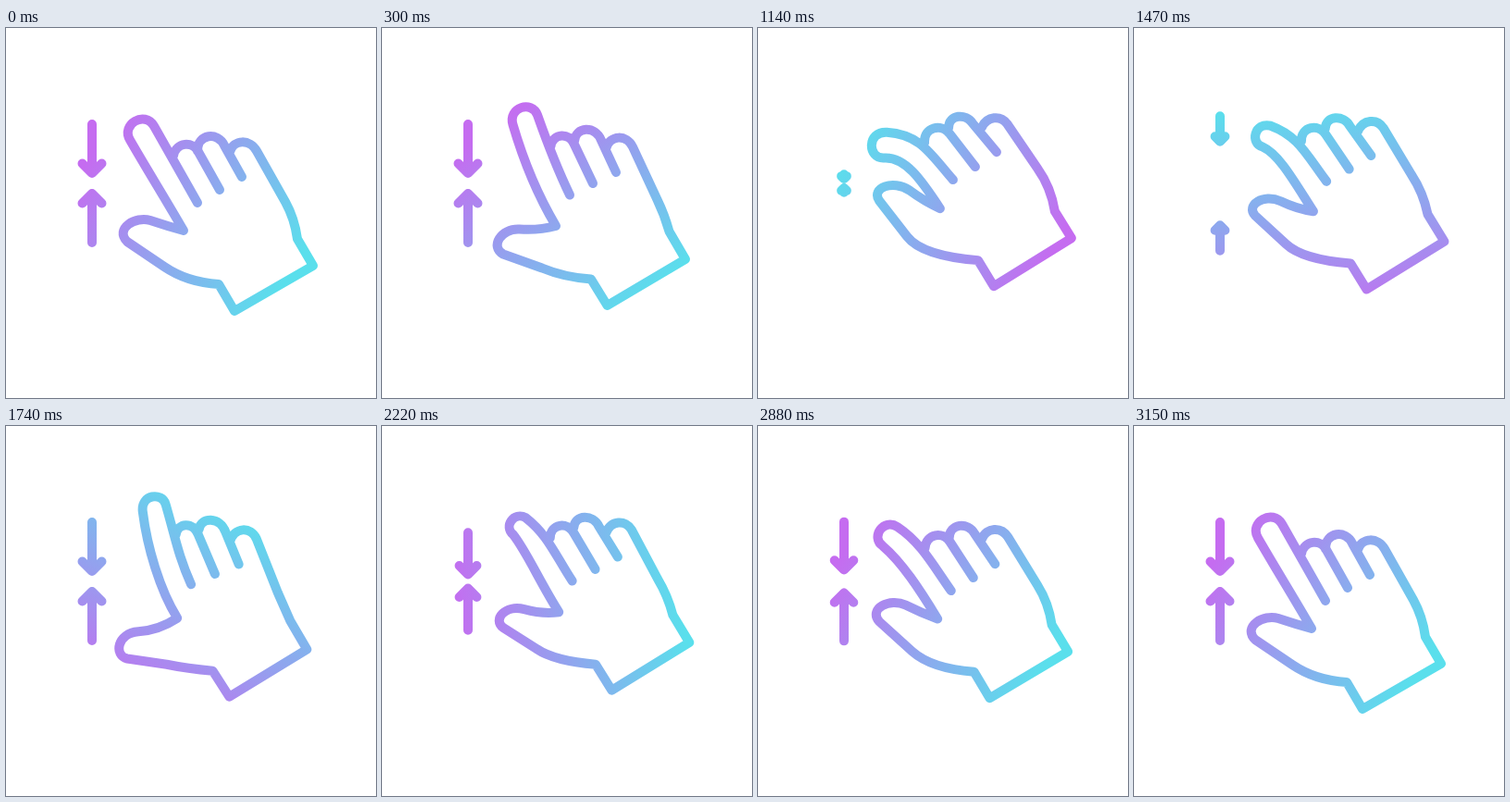
These frames come from a looping animation (400 px wide and 400 px high, 4180 ms). An HTML page:

```html
<!DOCTYPE html>
<html lang="en">
<head>
<meta charset="utf-8">
<title>Pinch gesture</title>
<style>
  html, body { margin: 0; width: 100%; height: 100%; overflow: hidden; background: #fff; }
  svg { display: block; width: 100%; height: 100%; }
  path { fill: none; stroke: url(#tint); stroke-width: 10; stroke-linecap: round; stroke-linejoin: round; }
</style>
</head>
<body>
<svg viewBox="0 0 400 400">
  <defs>
    <linearGradient id="tint" gradientUnits="userSpaceOnUse" x1="75" y1="200" x2="325" y2="200">
      <stop offset="0" stop-color="#c56cf0"/>
      <stop offset="1" stop-color="#5adfec"/>
    </linearGradient>
  </defs>
  <path id="hand"/>
  <path id="arrows"/>
</svg>
<script>
const LOOP = 4180, STEP = 30, END = 3150;
const [tint, hand, arrows] = ['tint', 'hand', 'arrows'].map(id => document.getElementById(id));

// All poses share one command structure: index, thumb, cuff, little finger, then two middle fingers.
const rest = `M207 189C191 161 176 134 160 106C150 89 124 104 134 121C153 154 173 186 192 219
  Q174 214 156 208C140 203 117 217 131 231L171 258Q196 275 230 277L247 306L332 257L315 228
  Q312 206 302 188L271 133C264 120 246 120 242 134
  M181 138C184 123 202 122 208 134L231 175M207 133C207 114 229 112 236 127L255 161`;
const open = `M199 172C186 140 184 122 176 82C174 67 148 67 149 88C152 130 165 178 184 209
  Q164 224 141 227C117 230 116 256 131 258L175 261Q198 264 222 266L240 294L324 243L306 212
  Q299 198 293 183L271 124C265 110 247 110 242 127
  M184 117C186 104 203 103 208 118L225 161M209 112C211 99 232 98 238 116L251 151`;
const pinch = `M211 164C187 137 176 115 139 113C117 112 118 142 136 141C159 139 176 163 197 195
  Q180 187 164 175C146 163 122 172 131 186L161 225Q177 246 238 251L255 279L339 227L321 198
  Q317 172 302 151L269 103C262 94 248 95 242 107
  M180 124C179 107 198 103 207 114L235 150M206 108C206 93 225 92 232 103L258 134`;

const moves = [
  [0, 600, rest, open],
  [630, 1170, open, pinch],
  [1300, 1840, pinch, open],
  [1930, 2470, open, pinch],
  [2560, 3150, pinch, rest]
];
const angles = [[0, 33], [330, 52], [630, 92], [900, 153], [1140, 208], [1440, 257],
  [1740, 300], [2220, 355], [2610, 385], [3150, 393]];

const mix = (a, b, p) => a + (b - a) * p;
const span = (t, from, to) => Math.min(1, Math.max(0, (t - from) / (to - from)));
const smooth = x => x * x * (3 - 2 * x);

function morph(a, b, p) {
  const goal = b.match(/\d+/g);
  let i = 0;
  return a.replace(/\d+/g, n => mix(+n, +goal[i++], p).toFixed(2));
}

function handPath(t) {
  const [from, to, a, b] = moves.filter(m => m[0] <= t).pop();
  return morph(a, b, smooth(span(t, from, to)));
}

function angleAt(t) {
  const i = Math.max(1, angles.findIndex(k => k[0] >= t));
  const [t0, a] = angles[i - 1], [t1, b] = angles[i];
  return mix(a, b, span(t, t0, t1));
}

function arrowShape(t) {
  const cycle = 1240;
  const shrinkStart = t < 1200 ? 845 : 845 + cycle;
  const growStart = t < 2430 ? 1230 : 1230 + cycle - 20;
  const q = span(t, shrinkStart, shrinkStart + 335);
  if (t > growStart && q === 1 || t > 1200 && q === 0) {
    const p = smooth(span(t, growStart, growStart + 470));
    return p && { tail: mix(86, 104, p), head: mix(86, 157, p), wing: 10.5 * p };
  }
  if (q === 1 || t > 1200 && t <= growStart && q === 0) return null;
  const head = 157 + 6 * Math.min(1, q * 1.4);
  return { tail: Math.min(head, 104 + 70 * q * q), head, wing: 10.5 * (1 - q ** 2.5) };
}

function arrowPath(shape) {
  if (!shape) return '';
  const { tail, head, wing } = shape, x = 93;
  const draw = y => `M${x} ${y(tail)}V${y(head)}
    M${x - wing} ${y(head - wing)}L${x} ${y(head)}L${x + wing} ${y(head - wing)}`;
  return draw(y => y) + draw(y => 336 - y);
}

function frame(now) {
  const t = Math.min(END, Math.floor((now % LOOP) / STEP) * STEP);
  hand.setAttribute('d', handPath(t));
  arrows.setAttribute('d', arrowPath(arrowShape(t)));
  tint.setAttribute('gradientTransform', `rotate(${angleAt(t)} 200 200)`);
}

let start;
function tick(now) {
  start ??= now;
  frame(now - start);
  requestAnimationFrame(tick);
}
frame(0);
requestAnimationFrame(tick);
</script>
</body>
</html>
```
